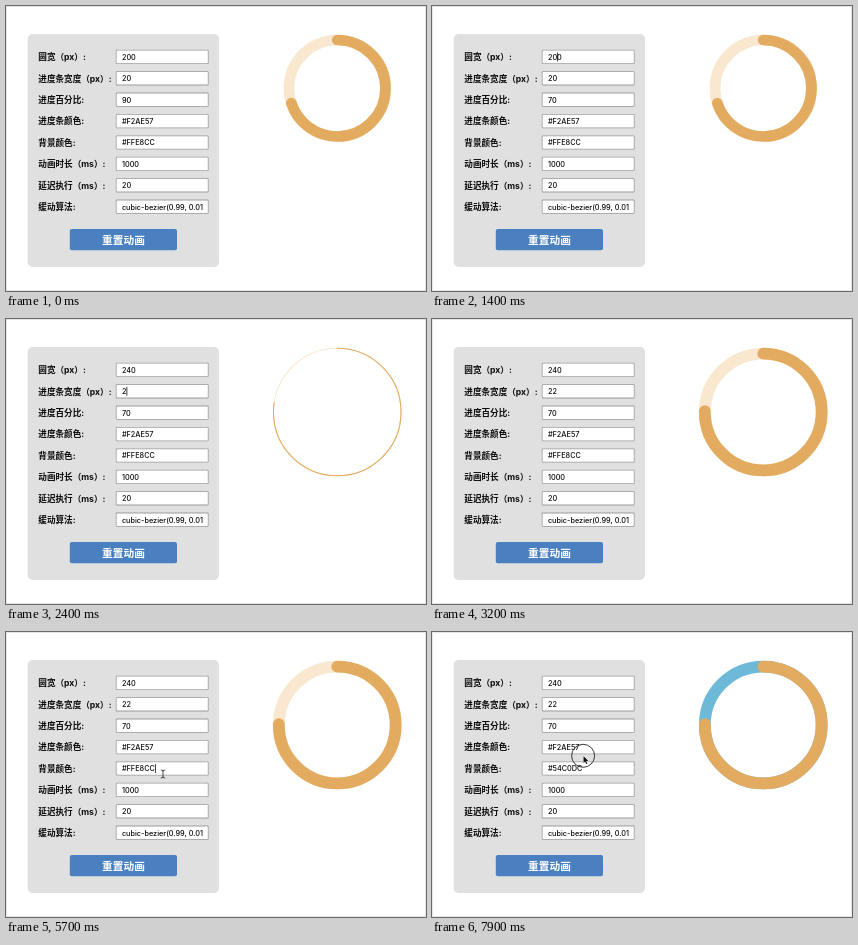
Animation, 420 px wide and 285 px high, one loop 8 s. Source, as an HTML page with a canvas:

```html
<!DOCTYPE html>
<html lang="zh">
<head>
<meta charset="utf-8">
<style>
html, body { margin: 0; width: 100%; height: 100%; overflow: hidden; background: #fff; }
canvas { display: block; width: 420px; height: 285px; }
</style>
</head>
<body>
<canvas id="stage"></canvas>
<script>
const W = 420, H = 285, LOOP = 8000, STEP = 100;
const K = 0.536; // page px to stage px
const canvas = document.getElementById('stage');
const ctx = canvas.getContext('2d');
const dpr = window.devicePixelRatio || 1;
canvas.width = W * dpr;
canvas.height = H * dpr;

const CJK = '"Noto Sans CJK SC", "Noto Sans CJK", sans-serif';
const INPUT_FONT = '500 7.3px Inter, ' + CJK;
const LABEL_FONT = 'bold 8.6px Inter, ' + CJK;
const BUTTON_FONT = 'bold 10.7px ' + CJK;

const labels = ['圆宽（px）:', '进度条宽度（px）:', '进度百分比:', '进度条颜色:',
  '背景颜色:', '动画时长（ms）:', '延迟执行（ms）:', '缓动算法:'];
const initial = ['200', '20', '90', '#F2AE57', '#FFE8CC', '1000', '20', 'cubic-bezier(0.99, 0.01'];
const WIDTH = 0, STROKE = 1, PERCENT = 2, BACK = 4;

// time, field, value, caret position
const edits = [
  [0, PERCENT, '90', 2],
  [200, PERCENT, '9', 1],
  [300, PERCENT, '', 0],
  [500, PERCENT, '7', 1],
  [600, PERCENT, '70', 2],
  [1100, WIDTH, '200', 3],
  [1300, WIDTH, '200', 2],
  [1500, WIDTH, '20', 1],
  [1700, WIDTH, '240', 2],
  [1900, STROKE, '20', 2],
  [2200, STROKE, '2', 1],
  [2600, STROKE, '22', 2],
  [5500, BACK, '#FFE8CC', 7],
  [6100, BACK, '#54C0DC', 7]
];
const SELECT = [5900, 6100];
const BLUR = 7800;

// The dash offset keeps the value of the first run: 30% of a 200/20 ring.
const OFFSET = 0.3 * 2 * Math.PI * 90;

const mouseKeys = [[5100, 190, 152], [5500, 157, 142], [6500, 157, 142],
  [6750, 428, 122], [6950, 428, 118], [7500, 151.5, 124], [8000, 151.5, 124]];

function stateAt(t) {
  const state = { values: initial.slice(), field: -1, caret: 0, since: 0 };
  for (const [at, field, value, caret] of edits) {
    if (t < at) break;
    state.values[field] = value;
    Object.assign(state, { field, caret, since: at });
  }
  if (t >= BLUR) state.field = -1;
  return state;
}

function box(x, y, w, h, r, fill) {
  ctx.beginPath();
  ctx.roundRect(x, y, w, h, r);
  ctx.fillStyle = fill;
  ctx.fill();
}

function text(str, x, y, font, color) {
  ctx.font = font;
  ctx.fillStyle = color;
  ctx.fillText(str, x, y);
}

function drawField(i, t, state) {
  const y = 43.8 + i * 21.4, value = state.values[i];
  text(labels[i], 32.3, y + 10.3, LABEL_FONT, '#0c0c0c');
  box(109.8, y, 92.8, 14.2, 1, '#9c9c9c');
  box(110.6, y + 0.8, 91.2, 12.6, 0.5, '#fff');

  ctx.save();
  ctx.beginPath();
  ctx.rect(115, y, 83, 14.2);
  ctx.clip();
  ctx.font = INPUT_FONT;
  const active = state.field === i;
  const selected = active && i === BACK && t >= SELECT[0] && t < SELECT[1];
  if (selected) box(115.9, y + 2, ctx.measureText(value).width, 10, 0, '#b5d5fb');
  text(value, 115.9, y + 9.9, INPUT_FONT, '#0c0c0c');
  const blinkOn = (t - state.since) % 1000 < 500;
  if (active && !selected && blinkOn && t > 0) {
    const x = 116 + ctx.measureText(value.slice(0, state.caret)).width;
    box(x, y + 2.6, 0.8, 9, 0, '#111');
  }
  ctx.restore();
}

function arc(cx, cy, r, from, to, width, color, cap) {
  ctx.beginPath();
  ctx.arc(cx, cy, r, from, to);
  ctx.lineWidth = width;
  ctx.lineCap = cap;
  ctx.strokeStyle = color;
  ctx.stroke();
}

function drawRing(values) {
  const size = +values[WIDTH], width = +values[STROKE];
  const r = (size - width) / 2;
  if (r <= 0) return;
  const cx = 331.25, cy = 28.65 + size * K / 2;
  const back = values[BACK] === '#54C0DC' ? '#6cb9d8' : '#fae7cf';
  const start = -Math.PI / 2;
  const sweep = Math.max(0, 2 * Math.PI - OFFSET / r);
  arc(cx, cy, r * K, 0, 2 * Math.PI, width * K, back, 'butt');
  arc(cx, cy, r * K, start, start + sweep, width * K, '#e3ab5f', 'round');
}

function mouseAt(t) {
  for (let i = 1; i < mouseKeys.length; i++) {
    const [t0, x0, y0] = mouseKeys[i - 1], [t1, x1, y1] = mouseKeys[i];
    if (t >= t0 && t < t1) {
      const p = (t - t0) / (t1 - t0), e = p * p * (3 - 2 * p);
      return [x0 + (x1 - x0) * e, y0 + (y1 - y0) * e];
    }
  }
  return null;
}

function drawBeam(x, y) {
  ctx.beginPath();
  ctx.moveTo(x - 1.8, y - 4);
  ctx.quadraticCurveTo(x, y - 4, x, y - 2.8);
  ctx.quadraticCurveTo(x, y - 4, x + 1.8, y - 4);
  ctx.moveTo(x, y - 3);
  ctx.lineTo(x, y + 3);
  ctx.moveTo(x - 1.8, y + 4);
  ctx.quadraticCurveTo(x, y + 4, x, y + 2.8);
  ctx.quadraticCurveTo(x, y + 4, x + 1.8, y + 4);
  ctx.lineWidth = 0.8;
  ctx.strokeStyle = '#222';
  ctx.stroke();
}

function drawArrow(x, y) {
  const points = [[0, 0], [0, 7], [1.6, 5.5], [2.7, 8], [3.8, 7.5], [2.7, 5.1], [4.9, 5]];
  ctx.beginPath();
  points.forEach(([dx, dy]) => ctx.lineTo(x + dx, y + dy));
  ctx.closePath();
  ctx.lineWidth = 0.9;
  ctx.strokeStyle = '#fff';
  ctx.stroke();
  ctx.fillStyle = '#111';
  ctx.fill();
}

function drawMouse(t) {
  const pos = mouseAt(t);
  const typing = t >= SELECT[0] && t < 6500;
  if (!pos || typing) return;
  const [x, y] = pos;
  if (t < 6500 && t >= 5400) drawBeam(x, y);
  else drawArrow(x, y);
  if (t >= 7600) arc(x - 0.4, y - 0.2, 11.5, 0, 2 * Math.PI, 0.9, '#222', 'butt');
}

function draw(t) {
  const state = stateAt(t);
  ctx.setTransform(dpr, 0, 0, dpr, 0, 0);
  box(0, 0, W, H, 0, '#fff');
  ctx.lineWidth = 1;
  ctx.strokeStyle = '#e6e6e6';
  ctx.strokeRect(0.5, 0.5, W - 1, H - 1);

  box(21.7, 28, 191.3, 233, 5, '#e0e0e0');
  ctx.textBaseline = 'alphabetic';
  ctx.textAlign = 'left';
  labels.forEach((_, i) => drawField(i, t, state));

  box(63.8, 223.1, 107.2, 21.2, 2, '#4a80c0');
  ctx.textAlign = 'center';
  text('重置动画', 117.5, 237.9, BUTTON_FONT, '#fff');

  drawRing(state.values);
  drawMouse(t);
}

const begin = performance.now();
function tick(now) {
  const t = Math.max(0, now - begin) % LOOP;
  draw(Math.floor(t / STEP) * STEP);
  requestAnimationFrame(tick);
}
draw(0);
requestAnimationFrame(tick);
</script>
</body>
</html>
```
